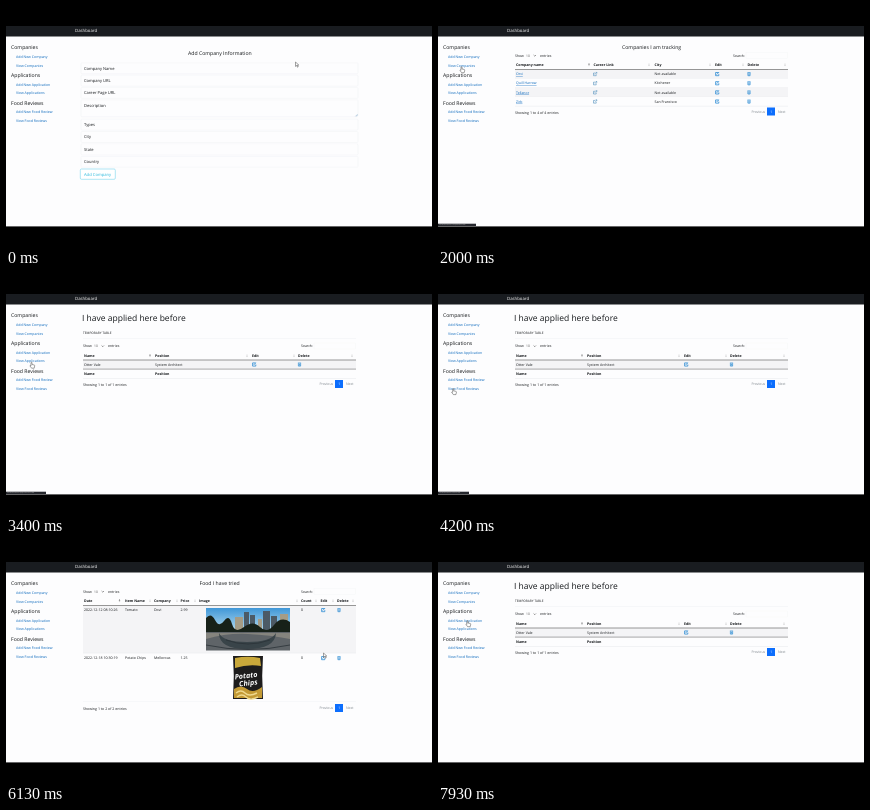
Write an HTML page that moves like this. It is 426 by 240 pixels and loops after 8000 ms.

```html
<!DOCTYPE html>
<html lang="en">
<head>
<meta charset="utf-8">
<title>Dashboard</title>
<style>
html, body { margin: 0; width: 100%; height: 100%; overflow: hidden; background: #000; }
svg { display: block; width: 100%; height: 100%; font-family: "Open Sans", "Noto Sans", sans-serif; text-rendering: geometricPrecision; }
</style>
</head>
<body>
<svg id="stage" viewBox="0 0 426 240"></svg>
<script>
const LOOP = 8000;
const INK = '#14171a', LINK = '#0a68bd', BLUE = '#0d6efd', STRIPE = '#f4f4f6';
const stage = document.getElementById('stage');

const text = (x, y, s, size = 3.55, fill = INK, extra = '') =>
  `<text x="${x}" y="${y + size * 0.35}" font-size="${size}" fill="${fill}" ${extra}>${s}</text>`;
const bold = (x, y, s) => text(x, y, s, 3.55, INK, 'font-weight="700"');
const rect = (x, y, w, h, fill, extra = '') =>
  `<rect x="${x}" y="${y}" width="${w}" height="${h}" fill="${fill}" ${extra}/>`;
const path = (d, fill, extra = '') => `<path d="${d}" fill="${fill}" ${extra}/>`;
const line = (y, color = '#e6e8eb', w = 0.5) => rect(77, y, 273, w, color);
const group = (id, body) => `<g id="${id}">${body}</g>`;

// Small icons
const edit = (x, y) => path(`M${x + 1.8} ${y - 1.5}h-3.2v3.2h3.2v-1.6M${x - 0.4} ${y + 0.6}l2.2 -2.2`,
  'none', 'stroke="#1680d0" stroke-width=".7"');
const trash = (x, y) => path(`M${x - 1.6} ${y - 1.4}h3.2M${x - 1.1} ${y - 1}v2.7h2.2v-2.7M${x} ${y - 0.6}v1.8`,
  'none', 'stroke="#1680d0" stroke-width=".65"');
const visit = (x, y) => path(`M${x} ${y - 1}h-1.5v2.7h2.7v-1.5M${x - 0.3} ${y + 0.5}l2.1 -2.1h-1.2m1.2 0v1.2`,
  'none', 'stroke="#4789b8" stroke-width=".55"');
const sort = (x, y, on) => path(`M${x - 0.8} ${y - 0.3}l.8 -1.2l.8 1.2z`, on ? '#333' : '#ccc') +
  path(`M${x - 0.8} ${y + 0.3}l.8 1.2l.8 -1.2z`, '#ccc');

// Shared table furniture
const controls = y => text(77, y, 'Show', 3.5) + text(88, y, '10', 3.3, '#555') +
  path(`M95.6 ${y - 0.5}l1.2 1.2l1.2 -1.2`, 'none', 'stroke="#333" stroke-width=".5"') +
  text(102, y, 'entries', 3.5) + text(295, y - 0.2, 'Search:', 3.5) +
  rect(308, y - 3, 41.5, 6, 'none', 'stroke="#f3f4f6" stroke-width=".4"');
const footer = (y, pageY, n) => text(77, y, `Showing 1 to ${n} of ${n} entries`) +
  text(313.5, pageY, 'Previous', 3.45, '#7d858c') + rect(329, pageY - 4, 8, 8, BLUE) +
  text(332.2, pageY, '1', 3.4, '#fff') + text(340, pageY, 'Next', 3.45, '#7d858c');
const heads = (y, cols) => cols.map(([x, s, sx, on]) => bold(x, y, s) + sort(sx, y, on)).join('');

function formPage() {
  const labels = ['Company Name', 'Company URL', 'Career Page URL', 'Description', 'Types', 'City', 'State', 'Country'];
  const ys = [62.3, 74.6, 86.9, 99.3, 118.6, 131, 143.4, 155.8];
  const fields = labels.map((s, i) =>
    rect(75, ys[i] - 5.5, 277, i === 3 ? 17 : 11, '#fdfdfe', 'rx="1" stroke="#eff1f3" stroke-width=".45"') +
    text(78, ys[i], s, 4.05)).join('');
  return text(182, 47.5, 'Add Company Information', 5.15) + fields +
    path('M349.5 110.3l2 -2M350.7 110.3l.8 -.8', 'none', 'stroke="#4d83b0" stroke-width=".4"') +
    rect(74.3, 163, 35, 10.3, '#fff', 'rx="1.2" stroke="#79d6ec" stroke-width=".6"') +
    text(78, 168.3, 'Add Company', 4.15, '#2bb9dc');
}

function companyPage() {
  const rows = [['Orvi', 'Not available'], ['Quill Harrow', 'Kitchener'],
    ['Tellanor', 'Not available'], ['Zirb', 'San Francisco']];
  return text(184, 41.5, 'Companies I am tracking', 5.15) + controls(49.5) +
    heads(58.7, [[78, 'Company name', 151, true], [155.5, 'Career Link', 211], [216.5, 'City', 272],
      [277, 'Edit', 305], [309.5, 'Delete', 347]]) +
    rows.map(([name, city], i) => {
      const y = 68 + i * 9.15;
      return rect(77, y - 4.5, 273, 9.15, i % 2 ? '#fdfdfe' : STRIPE) +
        text(78, y, name, 3.5, LINK, 'text-decoration="underline"') + visit(157, y) +
        text(216.5, y, city) + edit(279, y) + trash(311, y) + line(y + 4.4);
    }).join('') + line(63, '#555', 0.6) + footer(106.8, 105.5, 4);
}

function applicationPage() {
  return text(76, 43.7, 'I have applied here before', 8.5) + text(77, 58.8, 'TEMPORARY TABLE', 3.2) +
    line(64, '#eef0f2') + controls(72) +
    heads(81.7, [[78, 'Name', 144, true], [149, 'Position', 241], [246, 'Edit', 288], [292, 'Delete', 346]]) +
    rect(77, 86, 273, 9, STRIPE) + line(85.7, '#555', 0.6) + line(94.8, '#555', 0.5) +
    text(78, 90.6, 'Otter Vale') + text(149, 90.6, 'System Architect') + edit(248, 90.4) + trash(293.5, 90.4) +
    bold(78, 99.7, 'Name') + bold(149, 99.7, 'Position') + line(104) + footer(111.2, 110, 1);
}

function panorama() {
  const towers = [[229, 75, 8], [238, 70, 5], [244, 73, 5], [252, 77, 4], [257, 69, 7], [265, 74, 6], [274, 72, 8]];
  return `<linearGradient id="sky" x2="0" y2="1"><stop stop-color="#3f97d8"/><stop offset="1" stop-color="#c4e4f2"/></linearGradient>` +
    rect(200, 66, 84, 26, 'url(#sky)') +
    towers.map(([x, y, w], i) => rect(x, y, w, 90 - y, i % 3 ? '#4c5a66' : '#a59c86')).join('') +
    path('M200 76q5 -6 9 2t9 1t8 3t12 3t16 0t14 -2t16 -3v12h-84z', '#172119') +
    rect(200, 90, 84, 18.5, '#5f6468') + path('M200 97q20 -6 42 -5t42 5v-6h-84z', '#85847e') +
    path('M213 91q0 16 28 16t29 -16q-5 9 -29 9t-28 -9z', '#394449') +
    path('M220 98q22 8 44 0M200 103q42 9 84 0', 'none', 'stroke="#2b3338" stroke-width=".8"');
}

function chipBag() {
  const label = (x, y, s) => text(x, y, s, 7.2, '#fff', 'font-weight="700" font-style="italic"');
  return path('M227 114h30l-.8 20l.8 23h-30l.8 -23z', '#1d1c1c') +
    path('M229 116q13 -2.5 25 0l1 8q-13 -2 -26 2z', '#c9a83a') +
    path('M228 147q7 -5 13 0t15 -2v11h-28z', '#c39a35') +
    path('M230 151q5 -4 9 0t12 0M231 155q5 -4 9 0t12 0', 'none', 'stroke="#efd98e" stroke-width="1.4"') +
    `<g transform="rotate(-7 242 137)">${label(229, 133.5, 'Potato')}${label(232.5, 141, 'Chips')}</g>`;
}

function foodPage() {
  const row = (y, cells) => [78, 119, 148, 174.5, 295].map((x, i) => text(x, y, cells[i])).join('') +
    edit(317, y) + trash(333, y);
  return text(193.5, 41.5, 'Food I have tried', 5.15) + controls(49.5) +
    heads(58.7, [[78, 'Date', 113.5, true], [119, 'Item Name', 144], [148, 'Company', 171], [174.5, 'Price', 189],
      [193, 'Image', 291], [295, 'Count', 310], [314.5, 'Edit', 327], [331, 'Delete', 347]]) +
    rect(77, 63.5, 273, 47.5, STRIPE) + line(63, '#555', 0.6) + line(110.8) +
    row(68, ['2022-12-12 08:10:26', 'Tomato', 'Dovi', '2.99', '0']) +
    row(116, ['2022-12-18 10:30:19', 'Potato Chips', 'Mellorous', '1.25', '0']) + panorama() +
    group('pending', line(120.4) + footer(128, 127, 2)) +
    group('loaded', chipBag() + line(159.5, '#f1f2f4') + footer(167.2, 166, 2));
}

function sidebar() {
  const parts = [['Companies', 41.5, ['Add New Company', 'View Companies']],
    ['Applications', 69.2, ['Add New Application', 'View Applications']],
    ['Food Reviews', 97, ['Add New Food Review', 'View Food Reviews']]];
  return parts.map(([title, y, links]) => text(5, y, title, 5.15) +
    links.map((s, i) => text(10, y + 9.1 + i * 8.8, s, 3.55, LINK)).join('')).join('');
}

const outline = 'stroke="#333" stroke-width=".45" stroke-linejoin="round"';
stage.innerHTML = rect(0, 0, 426, 240, '#000') + rect(0, 30, 426, 190.4, '#fdfdfe') +
  rect(0, 20, 426, 10.5, '#191c20') + text(69, 24.8, 'Dashboard', 4.3, '#fff') + sidebar() +
  group('form', formPage()) + group('companies', companyPage()) +
  group('applications', applicationPage()) + group('food', foodPage()) +
  group('status', rect(0, 217.7, 40, 2.3, '#25272d', 'id="bar"') + text(1, 218.8, '', 1.8, '#aaa', 'id="hint"')) +
  group('cursor', group('arrow', path('M0 0v4.4l1.1 -1l.8 1.8l.8 -.4l-.8 -1.7h1.4z', '#fff', outline)) +
    group('hand', path('M0 0q.6 -.5 1 0v2l2.3 .5q.5 .2 .4 .9l-.5 2.3h-2.6l-1.7 -2.4q.2 -.7 1.1 0z', '#fff', outline)));

const el = id => document.getElementById(id);
const show = (id, on) => { el(id).style.display = on ? '' : 'none'; };

// time, x, y of the pointer
const track = [[0, 289.5, 56], [300, 289.5, 56], [1100, 26, 61], [1500, 23, 61], [2250, 23, 61],
  [2750, 25, 88.5], [3700, 25, 88.5], [4250, 14.5, 115.5], [5200, 14.5, 115.5], [5900, 317.5, 111],
  [6350, 317.5, 111], [6850, 269.5, 47], [7150, 269.5, 47], [7550, 26, 88.5], [7740, 26, 88.5], [7900, 29, 79], [8000, 29, 79]];
const pages = [[0, 'form'], [1650, 'companies'], [2950, 'applications'], [4500, 'food'], [7650, 'applications']];
const hints = [[1100, 38, 'localhost:8000/companies/view'], [2700, 40, 'localhost:8000/applications/view'],
  [4200, 31, 'localhost:8000/food/view'], [5260, 0, '']];

const latest = (list, t) => list.filter(k => k[0] <= t).pop();

function pointer(t) {
  const i = track.findIndex(k => k[0] > t);
  const [t0, x0, y0] = track[i - 1], [t1, x1, y1] = track[i];
  const p = (t - t0) / (t1 - t0), e = p * p * (3 - 2 * p);
  return [x0 + (x1 - x0) * e, y0 + (y1 - y0) * e];
}

function draw(t) {
  const page = latest(pages, t)[1];
  ['form', 'companies', 'applications', 'food'].forEach(id => show(id, id === page));
  show('pending', t < 5300);
  show('loaded', t >= 5300);

  const [x, y] = pointer(t);
  el('cursor').setAttribute('transform', `translate(${x} ${y})`);
  const overLink = x < 45;
  show('hand', overLink);
  show('arrow', !overLink);

  const [, width, hint] = latest(hints, t) || [0, 0, ''];
  show('status', width > 0);
  el('bar').setAttribute('width', width);
  el('hint').textContent = hint;
}

function tick() {
  draw(performance.now() % LOOP);
  requestAnimationFrame(tick);
}
tick();
</script>
</body>
</html>
```
